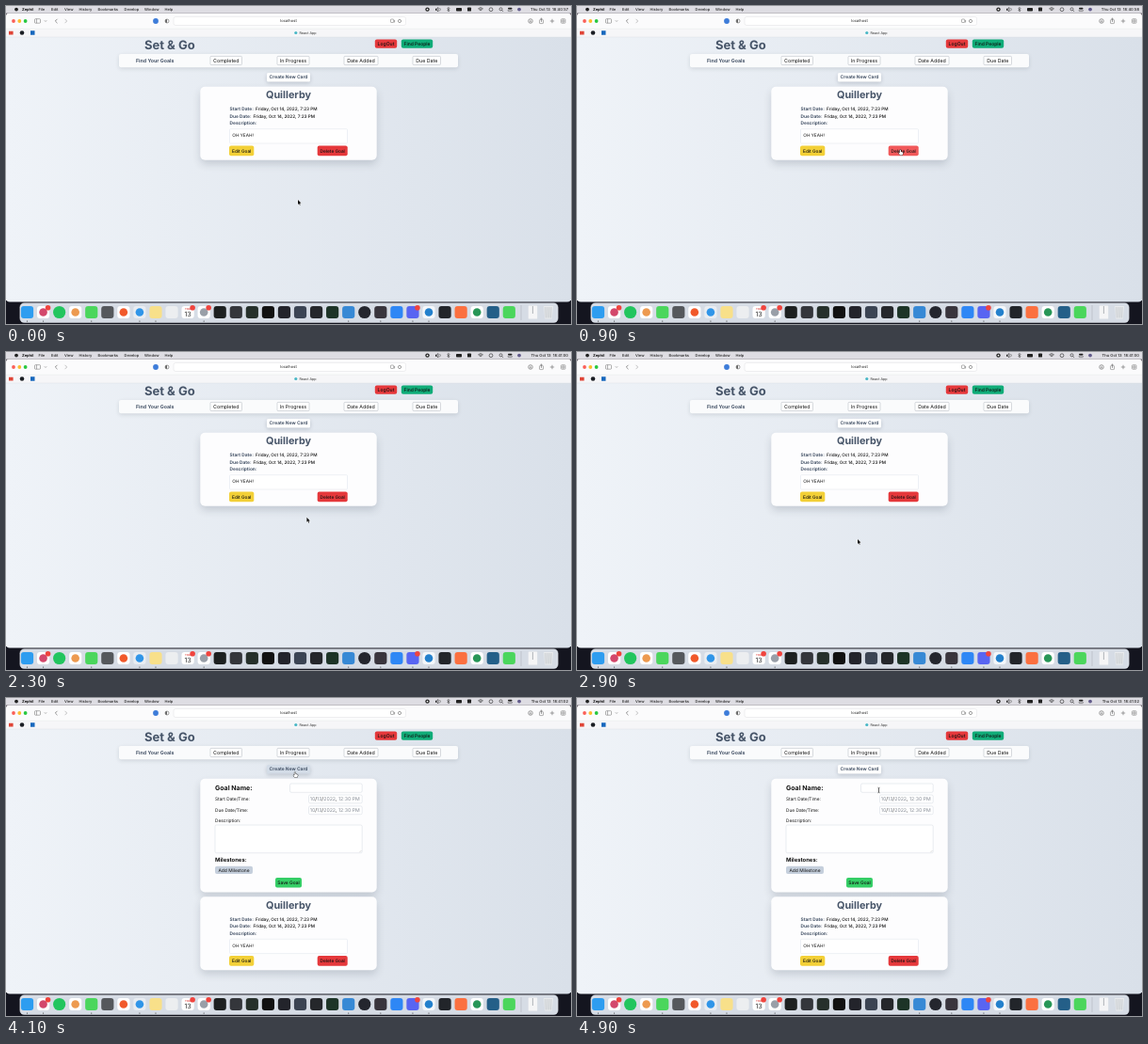
An HTML page with a canvas that plays this animation: 600 by 338 pixels, repeating every 5 s.

```html
<!DOCTYPE html>
<html lang="en">
<head>
<meta charset="utf-8">
<title>Goals</title>
<style>
html, body { margin: 0; width: 100%; height: 100%; overflow: hidden; background: #e5eaf1; }
canvas { display: block; width: 600px; height: 338px; }
</style>
</head>
<body>
<canvas id="stage"></canvas>
<script>
const W = 600, H = 338, LOOP = 5000, OPEN_AT = 4000;
const SLATE = '#475569', INK = '#111', RED = '#e5383b', RED_HOVER = '#f1595a';
const canvas = document.getElementById('stage');
const ctx = canvas.getContext('2d');
const dpr = Math.max(1, window.devicePixelRatio || 1);
canvas.width = W * dpr;
canvas.height = H * dpr;
ctx.textRendering = 'geometricPrecision';

// Cursor path: time, x, y
const path = [
  [0, 310, 206], [250, 311, 204], [750, 343, 153], [1000, 343.5, 153],
  [1500, 341, 152.5], [2000, 341, 152.5], [2600, 298, 199], [3000, 298, 199],
  [3550, 307, 79], [4250, 307, 79], [4750, 320.5, 98], [5000, 320.5, 98]
];

function box(x, y, w, h, r, fill, stroke, lw = 0.5) {
  ctx.beginPath();
  ctx.roundRect(x, y, w, h, r);
  if (fill) { ctx.fillStyle = fill; ctx.fill(); }
  if (stroke) { ctx.strokeStyle = stroke; ctx.lineWidth = lw; ctx.stroke(); }
}

function dot(x, y, r, fill) {
  ctx.beginPath();
  ctx.arc(x, y, r, 0, Math.PI * 2);
  ctx.fillStyle = fill;
  ctx.fill();
}

function ring(x, y, r, color = '#222') {
  ctx.beginPath();
  ctx.arc(x, y, r, 0, Math.PI * 2);
  ctx.strokeStyle = color;
  ctx.lineWidth = 0.6;
  ctx.stroke();
}

function line(points, color, lw = 0.6) {
  ctx.beginPath();
  points.forEach(([x, y], i) => i ? ctx.lineTo(x, y) : ctx.moveTo(x, y));
  ctx.strokeStyle = color;
  ctx.lineWidth = lw;
  ctx.stroke();
}

function text(s, x, y, size, color = INK, weight = 400, align = 'left') {
  ctx.font = `${weight} ${size}px Inter, "Liberation Sans", sans-serif`;
  ctx.textAlign = align;
  ctx.textBaseline = 'alphabetic';
  ctx.fillStyle = color;
  ctx.fillText(s, x, y + size * 0.36);
  return ctx.measureText(s).width;
}

function raised(x, y, w, h, r, fill, blur, drop, alpha) {
  ctx.save();
  ctx.shadowColor = `rgba(30,41,59,${alpha})`;
  ctx.shadowBlur = blur * dpr;
  ctx.shadowOffsetY = drop * dpr;
  box(x, y, w, h, r, fill);
  ctx.restore();
}

function button(label, x, y, w, h, fill, size = 4.75, weight = 500) {
  box(x, y, w, h, 2, fill);
  text(label, x + w / 2, y + h / 2, size, INK, weight, 'center');
}

function clock(t) {
  const s = 57 + Math.floor((t + 900) / 1000);
  const pad = n => String(n).padStart(2, '0');
  return `18:${40 + Math.floor(s / 60)}:${pad(s % 60)}`;
}

function menuBar(t) {
  box(0, 0, W, 7.5, 0, '#dedde3');
  dot(11, 3.6, 1.9, '#222');
  const items = [['File', 34.5], ['Edit', 48], ['View', 62], ['History', 77.5], ['Bookmarks', 97.5],
    ['Develop', 125.5], ['Window', 147], ['Help', 168.5]];
  text('Zephil', 17, 3.7, 4, INK, 700);
  items.forEach(([s, x]) => text(s, x, 3.7, 4, '#222', 500));
  text('Thu Oct 13  ' + clock(t), 597, 3.7, 4.1, '#222', 500, 'right');

  // Status icons
  dot(447.5, 3.6, 2.2, '#222');
  dot(447.5, 3.6, 0.9, '#fff');
  box(456, 2.7, 1.5, 2, 0, '#222');
  line([[457.5, 2.6], [459, 1.6], [459, 5.8], [457.5, 4.7]], '#222');
  line([[460.5, 2], [461.4, 3.6], [460.5, 5.3]], '#333', 0.5);
  line([[468.5, 2.3], [471, 4.8], [469.8, 6], [469.8, 1.3], [471, 2.5], [468.5, 5]], '#222', 0.5);
  box(478, 2, 6, 3.5, 0.8, '#222');
  box(490, 1.6, 4, 4, 0.7, '#222');
  for (let r = 1; r <= 3; r++) {
    ctx.beginPath();
    ctx.arc(504, 5.7, r * 1.3, -Math.PI * 0.75, -Math.PI * 0.25);
    ctx.strokeStyle = '#222';
    ctx.lineWidth = 0.6;
    ctx.stroke();
  }
  ring(515, 3.7, 1.9);
  ring(525.5, 3.3, 1.5);
  line([[526.5, 4.4], [528, 5.9]], '#222');
  box(533, 1.8, 4.5, 1.6, 0.8, '#222');
  box(533, 4, 4.5, 1.6, 0.8, null, '#222', 0.4);
  dot(545, 3.6, 1.9, '#625b8b');
}

function browser() {
  const gray = '#666';
  box(0, 7.5, W, 6, 0, '#4a424c');
  box(0, 7.8, W, 17, [3, 3, 0, 0], '#fbfbfc');
  box(0, 24, W, 9, 0, '#f6f6f8');
  line([[0, 24.2], [W, 24.2]], '#e1e2e5', 0.4);
  line([[0, 33], [W, 33]], '#d6d9de', 0.4);
  ['#fb5f57', '#fdbc2e', '#29c840'].forEach((c, i) => dot(8 + i * 6.3, 16, 1.9, c));
  box(30.5, 13.7, 6, 4.5, 0.8, null, gray);
  line([[32.5, 13.7], [32.5, 18.2]], gray, 0.5);
  line([[40.8, 15.3], [42, 16.5], [43.2, 15.3]], gray, 0.5);
  line([[54.5, 13.8], [52.3, 16], [54.5, 18.2]], gray, 0.7);
  line([[62.5, 13.8], [64.7, 16], [62.5, 18.2]], '#aaa', 0.7);
  dot(159, 16, 2.9, '#3d7cd9');
  ring(171, 16, 2, gray);
  ctx.beginPath();
  ctx.arc(171, 16, 2, Math.PI / 2, Math.PI * 1.5);
  ctx.fillStyle = gray;
  ctx.fill();
  box(178, 11.5, 246.5, 9, 2, '#fff', '#dedfe3', 0.5);
  text('localhost', 300, 16, 4.1, '#222', 400, 'center');
  box(408.5, 14, 3.2, 3.5, 0.6, null, gray);
  line([[412.6, 15], [412.6, 17.5]], gray);
  ring(418, 16, 1.6, gray);

  ring(557, 16, 2.3, gray);
  line([[557, 14.7], [557, 17.2]], gray);
  line([[556, 16.3], [557, 17.3], [558, 16.3]], gray, 0.5);
  box(566.5, 14.6, 4, 4, 0.6, null, gray);
  line([[568.5, 17], [568.5, 12.8]], gray);
  line([[567.5, 13.8], [568.5, 12.8], [569.5, 13.8]], gray, 0.5);
  line([[580, 13.8], [580, 18.2]], gray);
  line([[577.8, 16], [582.2, 16]], gray);
  box(589.5, 13.8, 4.4, 4.4, 0.5, null, gray);
  line([[591.7, 13.8], [591.7, 18.2]], gray, 0.5);
  line([[589.5, 16], [593.9, 16]], gray, 0.5);

  box(3, 26.7, 4.6, 3.8, 0, '#df4436');
  dot(17, 28.5, 2.3, '#1c1f24');
  box(26, 26.3, 4.5, 4.5, 0, '#1767bd');
  dot(307.8, 28.5, 1.6, '#49b7c6');
  text('React App', 311.5, 28.5, 3.7, '#333');
}

function backdrop() {
  const g = ctx.createLinearGradient(0, 0, W, 0);
  g.addColorStop(0, '#eff3f8');
  g.addColorStop(1, '#d9e0e9');
  box(0, 33, W, 285, 0, g);
}

function header(hover) {
  text('Set & Go', 147, 41, 13, SLATE, 700);
  button('LogOut', 391.8, 35.5, 23.4, 9.2, RED, 5.1);
  button('Find People', 419.8, 35.5, 33.4, 9.2, '#10ac78', 5);
  raised(120, 51, 360, 14.2, 2, '#fafbfc', 4, 1.5, 0.14);
  text('Find Your Goals', 138, 58, 5.3, SLATE, 700);
  [['Completed', 217, 33.5], ['In Progress', 288, 34], ['Date Added', 359, 36], ['Due Date', 432, 29.5]]
    .forEach(([s, x, w]) => {
      box(x, 53.4, w, 9.2, 1, '#fff', '#aeb4bd', 0.5);
      text(s, x + w / 2, 58, 5.3, INK, 400, 'center');
    });
  raised(277, 71, 46, 9.5, 1.5, hover ? '#d3dce7' : '#fff', 4, 1.4, 0.2);
  text('Create New Card', 300, 75.7, 4.95, SLATE, 700, 'center');
}

function panel(y, h) {
  raised(206.3, y, 187.4, h, 5, '#fdfdfe', 8, 4.5, 0.17);
}

function goalCard(dy, hover) {
  const when = 'Friday, Oct 14, 2022, 7:23 PM';
  ctx.save();
  ctx.translate(0, dy);
  panel(85.7, 78);
  text('Quillerby', 300, 94.5, 10.8, SLATE, 700, 'center');
  text('Start Date:', 237.5, 109.4, 4.85, SLATE, 700);
  text(when, 265, 109.4, 4.7, INK, 500);
  text('Due Date:', 237.5, 117, 4.85, SLATE, 700);
  text(when, 262.5, 117, 4.7, INK, 500);
  text('Description:', 237.5, 124.5, 4.85, SLATE, 700);
  box(237.5, 130.7, 125, 15.3, 1, '#fff', '#dce2ea');
  text('OH YEAH!', 240.3, 137.4, 4.7);
  button('Edit Goal', 237, 148.5, 26.3, 10.7, '#f3d037');
  button('Delete Goal', 330.7, 148.5, 32, 10.7, hover ? RED_HOVER : RED);
  ctx.restore();
}

function dateField(x, y) {
  '10/13/2022, 12:30 PM'.split(/([\/,])/).forEach(part => {
    const mark = part === '/' || part === ',';
    x += text(part, x, y, 5.2, mark ? '#333' : '#858b95');
  });
}

function form() {
  const field = (x, y, w, h) => box(x, y, w, h, 1.5, '#fff', '#d3d8e0');
  panel(85.7, 120.8);
  text('Goal Name:', 222, 95.7, 7, INK, 700);
  field(301.5, 91, 76.7, 9.3);
  [['Start Date/Time:', 107.3], ['Due Date/Time:', 119.2]].forEach(([s, y]) => {
    text(s, 222, y - 0.4, 4.8);
    field(321.5, y - 4.3, 56.7, 8.8);
    dateField(322.8, y + 0.2);
  });
  text('Description:', 222, 130.7, 4.8);
  field(222, 135, 156.2, 29.7);
  line([[375.6, 163.9], [377.3, 162.2]], '#999', 0.4);
  text('Milestones:', 222, 172, 5.9, INK, 700);
  button('Add Milestone', 222, 178.7, 40, 8.3, '#c5cfdc', 4.9, 400);
  button('Save Goal', 286, 191, 28, 10.5, '#35ce66', 4.9);
}

// Tile colour, then an optional disc on it; no tile means the disc stands alone
const apps = [
  ['#2e9df0'], ['#fff', '#d3486c'], ['', '#22c55e'], ['#fff', '#ed9a50'], ['#4bd65c'], ['#55585c'],
  ['#fff', '#f1592b'], ['#e9edf2', '#3095e8'], ['#f8e08a'], ['#eceef0'], ['#fff'], ['#fff', '#999fa8'],
  ['#1d2020'], ['#34363b'], ['#26302b'], ['#111'], ['#23242b'], ['#3b4453'], ['#25272b'],
  ['#1d3427'], ['#3789d5'], ['', '#24262e'], ['#39353d'], ['#2e87f5'], ['#5865f2'],
  ['#f4f7fa', '#2380cc'], ['#22252a'], ['#fb7040'], ['#fff', '#279657'], ['#245f88'], ['#4bd65c']
];
const running = [0, 1, 4, 7, 8, 11, 20, 22, 24, 25];

function dock() {
  box(0, 313, W, 25, 0, '#14151f');
  ctx.save();
  ctx.beginPath();
  ctx.rect(0, 312, W, 3);
  ctx.clip();
  ctx.restore();
  box(14.8, 315.7, 571.4, 20.8, 4.5, '#d6dce5', '#e4e7ec', 0.4);
  apps.forEach(([tile, disc], i) => {
    const x = 22.5 + i * 17.06;
    if (tile) box(x - 6.6, 318.9, 13.2, 13.2, 3, tile);
    if (disc) dot(x, 325.5, tile ? 4.3 : 6.6, disc);
    if (i === 10) {
      text('THU', x, 321.5, 2.8, '#df3f3b', 600, 'center');
      text('13', x, 327.4, 7.2, '#333', 400, 'center');
    }
    if (running.includes(i)) dot(x, 335, 0.6, '#333');
  });
  [1, 10, 11, 24].forEach(i => dot(27.5 + i * 17.06, 320.8, 2.8, '#f0443e'));
  line([[547, 318], [547, 334]], '#a9aeb7', 0.5);
  box(554.7, 318.5, 9.5, 14, 0.5, '#f5f5f6');
  line([[559.4, 319], [559.4, 327]], '#a0a4aa', 0.8);
  ctx.beginPath();
  ctx.moveTo(571, 319);
  ctx.lineTo(581, 319);
  ctx.lineTo(579.7, 332.5);
  ctx.lineTo(572.3, 332.5);
  ctx.closePath();
  ctx.fillStyle = '#e9ebed';
  ctx.fill();
  for (let i = 0; i < 4; i++) line([[572.7 + i * 2.1, 320], [573.3 + i * 1.8, 331.5]], '#a4aab0', 0.5);
}

function cursorAt(t) {
  const i = path.findIndex(p => p[0] > t);
  const [t0, x0, y0] = path[i - 1], [t1, x1, y1] = path[i];
  const u = (t - t0) / (t1 - t0), e = u * u * (3 - 2 * u);
  return [x0 + (x1 - x0) * e, y0 + (y1 - y0) * e];
}

const shapes = {
  arrow: 'M0 0L0 5L1.1 4L1.9 5.8L2.7 5.4L1.9 3.7L3.5 3.6Z',
  hand: 'M-.6 0Q0-.6 .5 0L.6 1.9L2.6 2.4Q3 2.6 2.8 3.7L2.2 5.4L-.3 5.4L-1.8 3.3Q-1.5 2.6-.6 3.2Z'
};

function cursor(x, y, kind) {
  ctx.save();
  ctx.translate(x, y);
  if (kind === 'beam') {
    line([[-1, -2.8], [0, -2.3], [1, -2.8]], '#222', 0.6);
    line([[0, -2.3], [0, 2.3]], '#222', 0.7);
    line([[-1, 2.8], [0, 2.3], [1, 2.8]], '#222', 0.6);
  } else {
    const p = new Path2D(shapes[kind]);
    const arrow = kind === 'arrow';
    ctx.lineJoin = 'round';
    ctx.strokeStyle = arrow ? '#fff' : '#111';
    ctx.lineWidth = 0.9;
    ctx.stroke(p);
    ctx.fillStyle = arrow ? '#111' : '#fff';
    ctx.fill(p);
  }
  ctx.restore();
}

const inside = (x, y, l, t, r, b) => x >= l && x <= r && y >= t && y <= b;

function draw(now) {
  const t = now % LOOP, open = t >= OPEN_AT;
  const [x, y] = cursorAt(t);
  const onCreate = inside(x, y, 277, 71, 323, 80.5);
  const onDelete = !open && inside(x, y, 331, 149, 363, 159);
  const onField = open && inside(x, y, 301, 91, 378, 100.5);
  ctx.setTransform(dpr, 0, 0, dpr, 0, 0);
  dock();
  ctx.save();
  ctx.beginPath();
  ctx.roundRect(0, 0, W, 314.5, [0, 0, 4, 4]);
  ctx.clip();
  backdrop();
  header(onCreate);
  if (open) form();
  goalCard(open ? 125.6 : 0, onDelete);
  browser();
  menuBar(t);
  ctx.restore();
  cursor(x, y, onField ? 'beam' : onCreate || onDelete ? 'hand' : 'arrow');
}

const start = performance.now();
function tick() {
  draw(performance.now() - start);
  requestAnimationFrame(tick);
}
tick();
</script>
</body>
</html>
```
